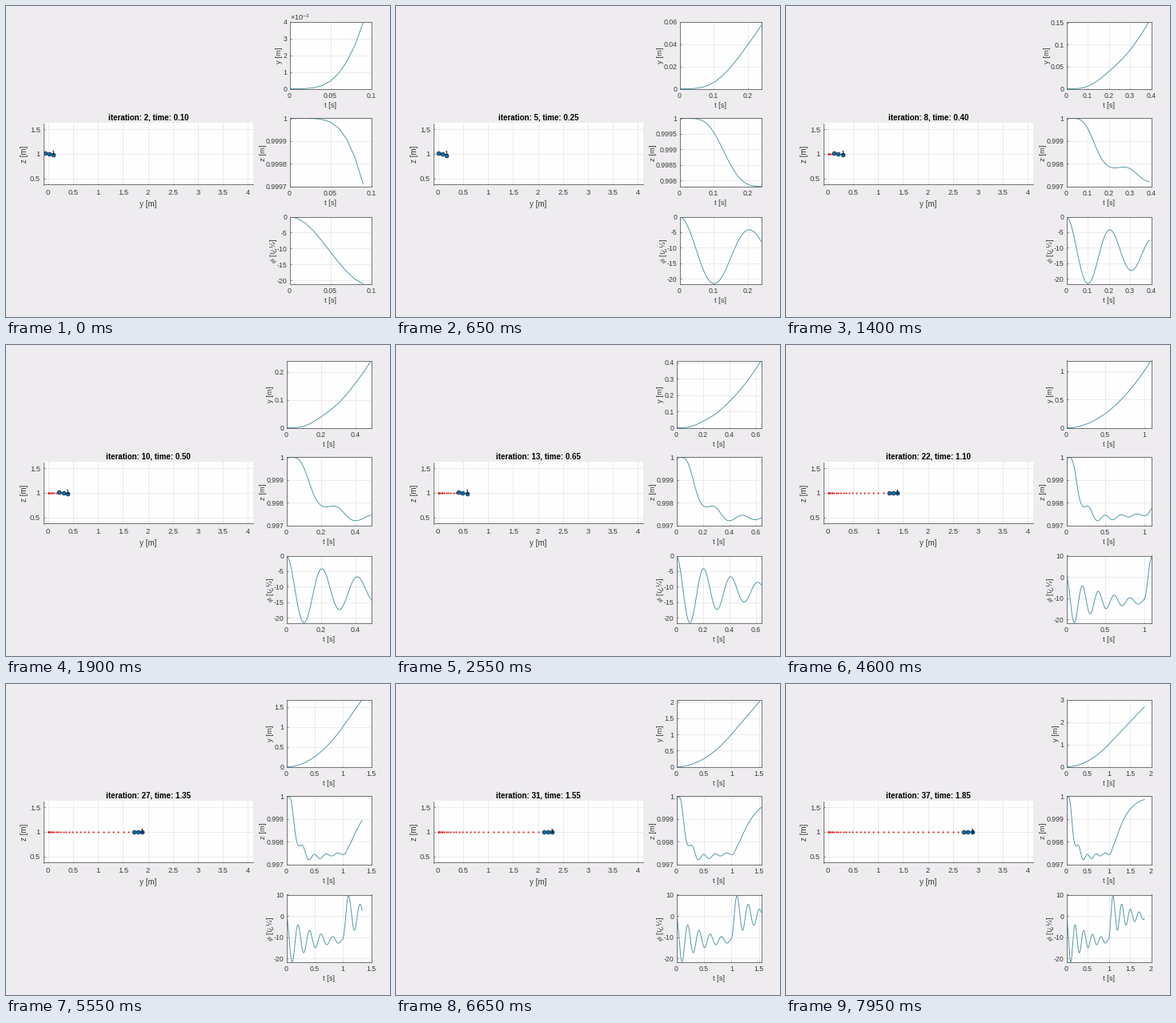
Animation of 480 by 389 pixels, one loop 8000 ms. Source, as a matplotlib script:

```python
import math

import matplotlib.pyplot as plt
import numpy as np
from matplotlib.animation import FuncAnimation

W, H, DPI = 480, 389, 100
FRAMES, INTERVAL = 160, 50
UPDATE_MS, UPDATE_SHIFT, FIRST_ITER = 227, 0.58, 2

G, ARM, DT = 9.81, 0.086, 0.001
KP_Y, KV_Y = 20, 5
KP_Z, KV_Z = 80, 20
KP_PHI, KV_PHI = 1000, 10

BG, INK, GRID, FRAME = "#eeecef", "#3c3c3c", "#e9e9eb", "#686868"
CURVE, BODY, TRAIL = "#4a8fa4", "#0f6cab", "#e02020"
TICK_PX, DIGIT_PX = 8.8, 8.2

plt.rcParams["font.family"] = ["Liberation Sans", "DejaVu Sans"]
plt.rcParams["mathtext.fontset"] = "stix"


def pt(px):
    return px * 72 / DPI


# ---- planar quadrotor under PD control ----
def derivative(t, s):
    y, z, phi, vy, vz, om = s
    if t < 1:
        yd, vd, ad = t * t, 2 * t, 2
    else:
        yd, vd, ad = 2 * t - 1, 2, 0
    thrust = G + KP_Z * (1 - z) - KV_Z * vz
    phi_c = -(ad + KV_Y * (vd - vy) + KP_Y * (yd - y)) / G
    return np.array([vy, vz, om,
                     -thrust * math.sin(phi),
                     thrust * math.cos(phi) - G,
                     KP_PHI * (phi_c - phi) - KV_PHI * om])


def simulate(steps):
    s = np.array([0, 1, 0, 0, 0, 0], float)
    out = [s]
    for i in range(steps):
        t = i * DT
        k1 = derivative(t, s)
        k2 = derivative(t + DT / 2, s + DT / 2 * k1)
        k3 = derivative(t + DT / 2, s + DT / 2 * k2)
        k4 = derivative(t + DT, s + DT * k3)
        s = s + DT / 6 * (k1 + 2 * k2 + 2 * k3 + k4)
        out.append(s)
    return np.array(out)


Y, Z, PHI = simulate(2000).T[:3]
T = np.arange(len(Y)) * DT


# ---- axis limits and ticks ----
def limits(lo, hi, most):
    """Tick step plus limits, widened to the next tick when it is close."""
    need = (hi - lo) / most
    mag = 10.0 ** math.floor(math.log10(need))
    step = mag * next(m for m in (1, 2, 5, 10) if m * mag >= need)
    low = math.floor(lo / step + 1e-6) * step
    high = math.ceil(hi / step - 1e-6) * step
    if lo - low <= step / 2:
        lo = low
    if high - hi <= step / 2:
        hi = high
    first, last = math.ceil(lo / step - 1e-6), math.floor(hi / step + 1e-6)
    return lo, hi, step, [k * step for k in range(first, last + 1)]


def names(ticks, unit=1.0):
    return [f"{round(v / unit, 6) + 0:g}" for v in ticks]


def text_width(s):
    em = {".": 0.278, "-": 0.333}
    return DIGIT_PX * sum(em.get(c, 0.556) for c in s)


# ---- figure ----
fig = plt.figure(figsize=(W / DPI, H / DPI), dpi=DPI, facecolor=BG)


def box(left, top, right, bottom):
    return [left / W, 1 - bottom / H, (right - left) / W, (bottom - top) / H]


def label(x, y, s, px, **kw):
    kw = {"ha": "center", "va": "center", "color": INK, **kw}
    return fig.text(x / W, 1 - y / H, s, fontsize=pt(px), **kw)


def make_axes(rect, px, xpad, ypad):
    ax = fig.add_axes(box(*rect), facecolor="#fefefe")
    ax.set_axisbelow(True)
    ax.grid(color=GRID, lw=pt(0.9))
    ax.tick_params(direction="in", length=pt(1.5), width=pt(0.8),
                   color=FRAME, labelcolor=INK, labelsize=pt(px))
    ax.tick_params(axis="x", pad=pt(xpad))
    ax.tick_params(axis="y", pad=pt(ypad))
    for spine in ax.spines.values():
        spine.set(color=FRAME, linewidth=pt(0.9))
    return ax


main = make_axes((46.5, 146.5, 308.5, 223.5), 9.4, 6, 3.5)
main.spines[["top", "right"]].set_visible(False)
main.set(xlim=(-0.1, 4.1), ylim=(0.378, 1.622))
xt, yt = np.arange(0, 4.1, 0.5), [0.5, 1, 1.5]
main.set_xticks(xt, names(xt))
main.set_yticks(yt, names(yt))
label(177.5, 248, "y [m]", 9.8)
label(22.5, 185.5, "z [m]", 9.8, rotation=90)
title = label(178.2, 139.7, "", 9.8, weight="bold", color="black")

trail, = main.plot([], [], "o", color=TRAIL, ms=pt(2.1), mew=0)
body, = main.plot([], [], "o-", color="#20506e", lw=pt(1), ms=pt(4.8),
                  mfc=BODY, mec="#12344c", mew=pt(0.8))
tag = main.text(0, 0, "1", fontsize=pt(8.2), color="black",
                ha="center", va="center")


class Plot:
    RIGHT = 456.5

    def __init__(self, top, bottom, name, data):
        self.top, self.bottom, self.data = top, bottom, data
        self.ax = make_axes((350.5, top, self.RIGHT, bottom), TICK_PX, 4.5, 3)
        self.line, = self.ax.plot([], [], color=CURVE, lw=pt(0.9))
        self.xlabel = label(404, bottom + 21, "t [s]", 9.2)
        self.ylabel = label(326, (top + bottom) / 2 + 0.5, name, 9.4,
                            rotation=90)
        self.power = label(355, top - 5.5, "", 9, ha="left")

    def scale(self, n):
        d = self.data[:n:10]
        return limits(d.min(), d.max(), 4.8)

    def update(self, n, left):
        self.line.set_data(T[:n:10], self.data[:n:10])
        x0, x1, _, xticks = limits(0, T[n - 10], 4)
        y0, y1, _, yticks = self.scale(n)
        small = max(abs(y0), abs(y1)) < 0.01
        ynames = names(yticks, 1e-3 if small else 1.0)
        self.ax.set_position(box(left, self.top, self.RIGHT, self.bottom))
        self.ax.set_xticks(xticks, names(xticks))
        self.ax.set_yticks(yticks, ynames)
        self.ax.set(xlim=(x0, x1), ylim=(y0, y1))
        self.power.set_text("×10$^{\\mathregular{-3}}$" if small else "")
        self.xlabel.set_x((left + self.RIGHT) / 2 / W)
        wide = max(map(text_width, ynames))
        self.ylabel.set_x((left - 8.2 - wide) / W)


plots = [Plot(19.5, 103.5, "y [m]", Y),
         Plot(140.5, 225.5, "z [m]", Z),
         Plot(263.5, 347.5, r"$\phi$ [ï¿½]", np.degrees(PHI))]


def draw(frame):
    it = FIRST_ITER + int(frame * INTERVAL / UPDATE_MS + UPDATE_SHIFT)
    n, now = it * 50, (it + 1) * 50
    title.set_text(f"iteration: {it}, time: {it * 0.05:.2f}")

    trail.set_data(Y[:now + 1:50], Z[:now + 1:50])
    arm = ARM * np.array([-1, 0, 1])
    body.set_data(Y[now] + arm * math.cos(PHI[now]),
                  Z[now] + arm * math.sin(PHI[now]))
    tag.set_position((Y[now] + 0.078, Z[now] + 0.008))

    # four-decimal tick labels push the column of plots to the right
    left = 354.5 if plots[1].scale(n)[2] < 0.0009 else 350.5
    for p in plots:
        p.update(n, left)
    return []


anim = FuncAnimation(fig, draw, frames=FRAMES, interval=INTERVAL,
                     init_func=lambda: [], repeat=True, repeat_delay=0,
                     blit=False)
plt.show()
```
